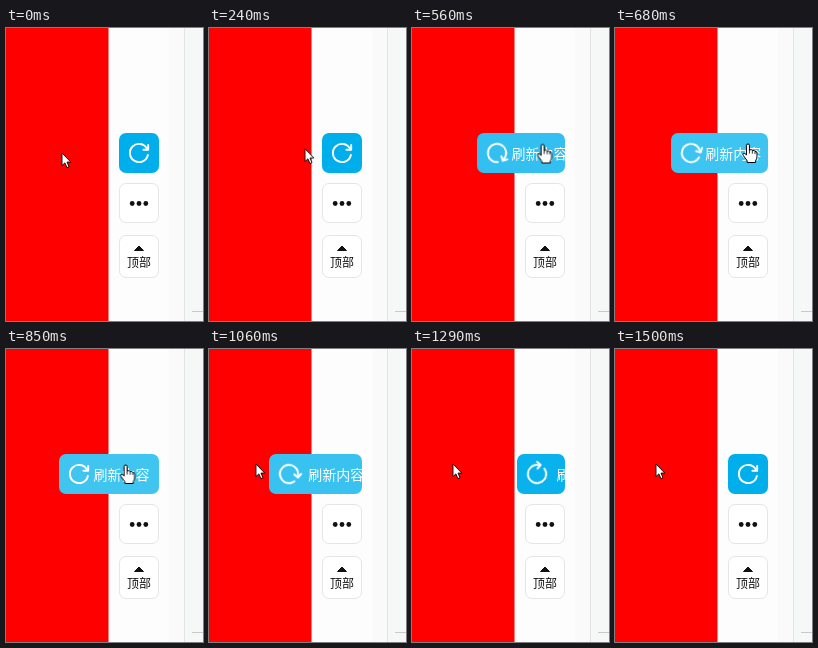
An HTML page that plays this animation: 197 by 293 pixels, repeating every 1.64 s.

```html
<!DOCTYPE html>
<html lang="zh-CN">
<head>
<meta charset="utf-8">
<title>刷新内容</title>
<style>
  :root { --loop: 1640ms infinite; }
  html, body { margin: 0; width: 100%; height: 100%; overflow: hidden; background: #fdfdfd; }
  body { position: relative; font-family: "Noto Sans CJK SC", "Noto Sans CJK", "Noto Sans", sans-serif; }
  svg { position: absolute; left: 0; top: 0; overflow: visible; }

  .refresh {
    position: absolute; left: 113px; top: 105px; width: 40px; height: 40px;
    border-radius: 7px; overflow: hidden; background: #00aeec; color: #fff;
    animation: expand var(--loop);
  }
  .icon { left: 10px; top: 10px; transform-origin: 50% 50%; animation: spin var(--loop); }
  .label {
    position: absolute; left: 39.5px; top: 0;
    font-size: 14px; line-height: 40px; white-space: nowrap;
    animation: shift var(--loop) step-end;
  }
  .cursor { animation: move var(--loop) linear; }
  .arrow { animation: arrow var(--loop) step-end; }
  .hand { animation: hand var(--loop) step-end; }

  /* hover starts at 313 ms, ends at 1005 ms; each transition takes 500 ms */
  @keyframes expand {
    0%, 19.09% { left: 113px; width: 40px; background: #00aeec; animation-timing-function: ease; }
    49.57%, 61.28% { left: 53px; width: 100px; background: #40c5f1; animation-timing-function: ease; }
    91.77%, 100% { left: 113px; width: 40px; background: #00aeec; }
  }
  @keyframes spin {
    0%, 19.09% { transform: rotate(0deg); animation-timing-function: ease; }
    49.57%, 61.28% { transform: rotate(-360deg); animation-timing-function: ease; }
    91.77%, 100% { transform: rotate(0deg); }
  }
  @keyframes shift {
    0%, 61.28%, 100% { left: 39.5px; }
    19.09% { left: 34.5px; }
  }
  @keyframes move {
    0%, 4.88% { transform: translate(56px, 125px); }
    19.09% { transform: translate(114px, 119px); }
    26.22% { transform: translate(128px, 117px); }
    41.46% { transform: translate(133px, 116px); }
    51.83% { transform: translate(120px, 116px); }
    61.28% { transform: translate(53px, 115px); }
    64.63% { transform: translate(47px, 115px); }
    70.1%, 100% { transform: translate(41px, 115px); }
  }
  @keyframes arrow {
    0%, 61.28%, 100% { visibility: visible; }
    19.09% { visibility: hidden; }
  }
  @keyframes hand {
    0%, 61.28%, 100% { visibility: hidden; }
    19.09% { visibility: visible; }
  }
</style>
</head>
<body>
<svg width="197" height="293" viewBox="0 0 197 293">
  <rect width="102.5" height="293" fill="#f00"/>
  <rect x="163" width="15" height="293" fill="#fafafa"/>
  <rect x="178" width="19" height="293" fill="#f6f8f7"/>
  <path d="M178.5 0V293" stroke="#e1e4e4"/>
  <path d="M186 283.5H197" stroke="#c8cbcb"/>
  <g fill="#fff" stroke="#e3e5e7">
    <rect x="113.5" y="155.5" width="39" height="39" rx="6.5"/>
    <rect x="113.5" y="207.5" width="39" height="42" rx="6.5"/>
  </g>
  <g fill="#111">
    <circle cx="126.2" cy="175.5" r="2.4"/>
    <circle cx="133" cy="175.5" r="2.4"/>
    <circle cx="139.8" cy="175.5" r="2.4"/>
    <path d="M133 218L137.5 222.5H128.5Z" stroke="#111" stroke-linejoin="round"/>
    <text x="133" y="239" font-size="12" text-anchor="middle">顶部</text>
  </g>
</svg>

<div class="refresh">
  <svg class="icon" width="20" height="20" viewBox="-10 -10 20 20" fill="none" stroke="#fff" stroke-width="1.9" stroke-linecap="round" stroke-linejoin="round">
    <path d="M8 -4.4A9.1 9.1 0 1 0 8.9 2"/>
    <path d="M9.2 -8V-3.2H4.4"/>
  </svg>
  <span class="label">刷新内容</span>
</div>

<svg width="197" height="293" viewBox="0 0 197 293">
  <g class="cursor" fill="#fff" stroke="#000" stroke-linejoin="round">
    <path class="arrow" stroke-width=".9" d="M0 0V12.6L2.9 9.9L4.9 14.6L7 13.7L5 9.1H8.8Z"/>
    <g class="hand" stroke-width="1">
      <path d="M-1.5 1.2Q-1.5 0 0 0T1.5 1.2V6Q4 5 4.4 6.6Q6.6 6 7 7.5Q9 7.2 9 9.2V13Q9 15 7.6 16.5V18.5H-.8V16.8L-4.6 11.6Q-5.6 9.9 -4.4 9.3Q-3.3 8.8 -1.5 11Z"/>
      <path d="M1.5 6V9.5M4.4 6.6V9.7M7 7.5V10" fill="none" stroke-width=".8"/>
    </g>
  </g>
</svg>
</body>
</html>
```
